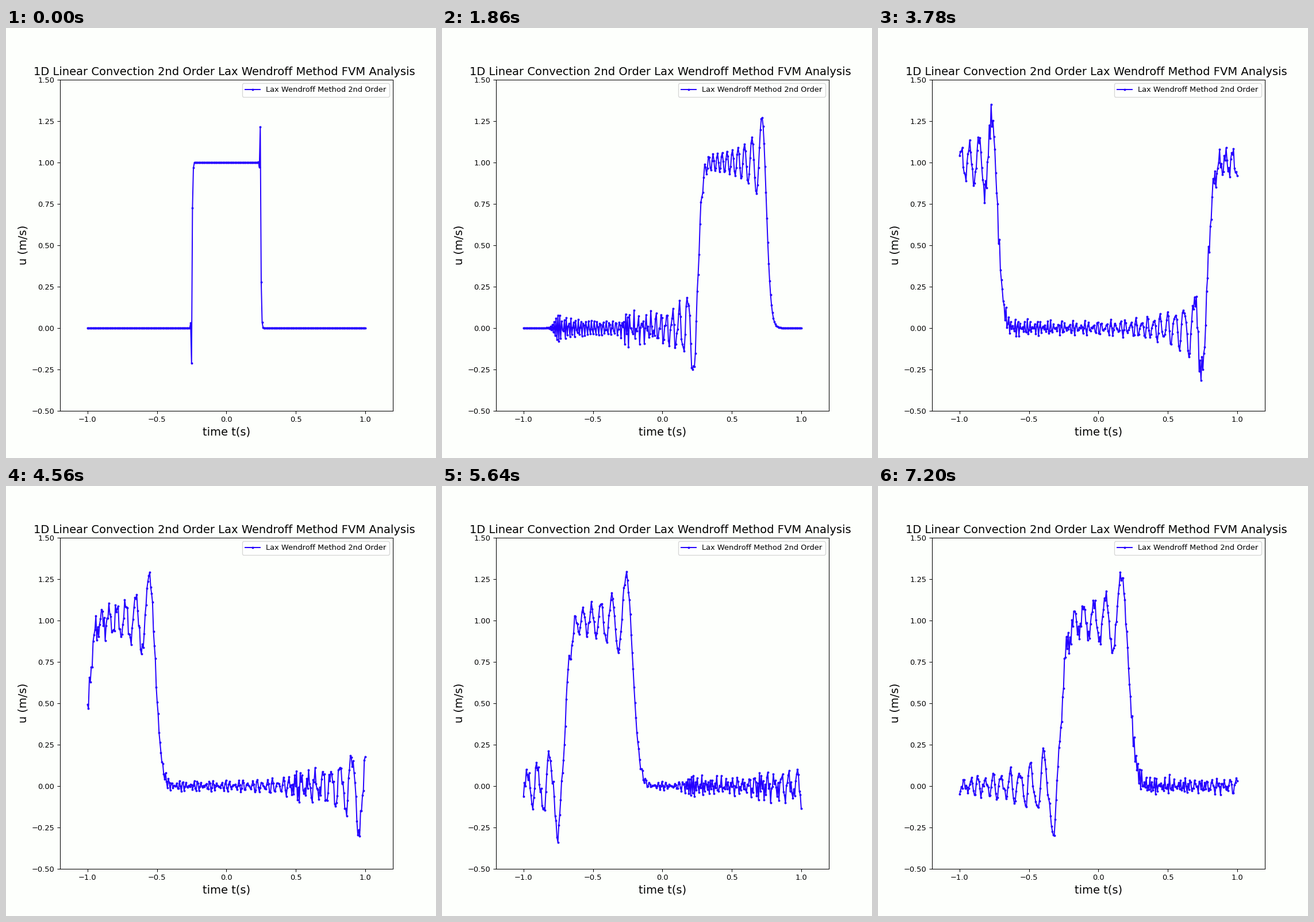
A matplotlib script that plays this animation: 748x748 px, repeating every 7260 ms.

```python
import numpy as np
import matplotlib.pyplot as plt
from matplotlib.animation import FuncAnimation

CELLS = 300
CFL = 0.5
STEPS = 600
STRIDE = 5
FRAMES = 121
BLUE = "#2400ff"
PAPER = "#fdfffc"

x = np.linspace(-1, 1, CELLS)


def rate(u):
    """Net flux of the central face values on a periodic grid."""
    face = 0.5 * (u + np.roll(u, -1))
    return -CFL * (face - np.roll(face, 1))


def advance(u):
    """One third-order Runge-Kutta step."""
    a = u + rate(u)
    b = 0.75 * u + 0.25 * (a + rate(a))
    return u / 3 + 2 / 3 * (b + rate(b))


def solve():
    history = [np.where(np.abs(x) < 0.25, 1.0, 0.0)]
    for _ in range(STEPS):
        history.append(advance(history[-1]))
    return history


history = solve()

fig, ax = plt.subplots(figsize=(8, 8), dpi=93.5, facecolor=PAPER)
ax.set_facecolor(PAPER)
line, = ax.plot(x, history[1], "o-", color=BLUE, markersize=2, snap=False,
                label="Lax Wendroff Method 2nd Order")
ax.set_xlim(-1.2, 1.2)
ax.set_ylim(-0.5, 1.5)
ax.set_xticks(np.arange(-1, 1.1, 0.5))
ax.set_yticks(np.arange(-0.5, 1.6, 0.25))
# the trailing space belongs to the centred title
ax.set_title("1D Linear Convection 2nd Order Lax Wendroff Method FVM Analysis ",
             fontsize=15)
ax.set_xlabel("time t(s)", fontsize=15)
ax.set_ylabel("u (m/s)", fontsize=15)
ax.legend(loc="upper right")


def update(frame):
    # plotted after every fifth step, and once more at the end
    line.set_ydata(history[min(STRIDE * frame + 1, STEPS)])
    return line,


anim = FuncAnimation(fig, update, frames=FRAMES, interval=60,
                     repeat=True, repeat_delay=0)
plt.show()
```
